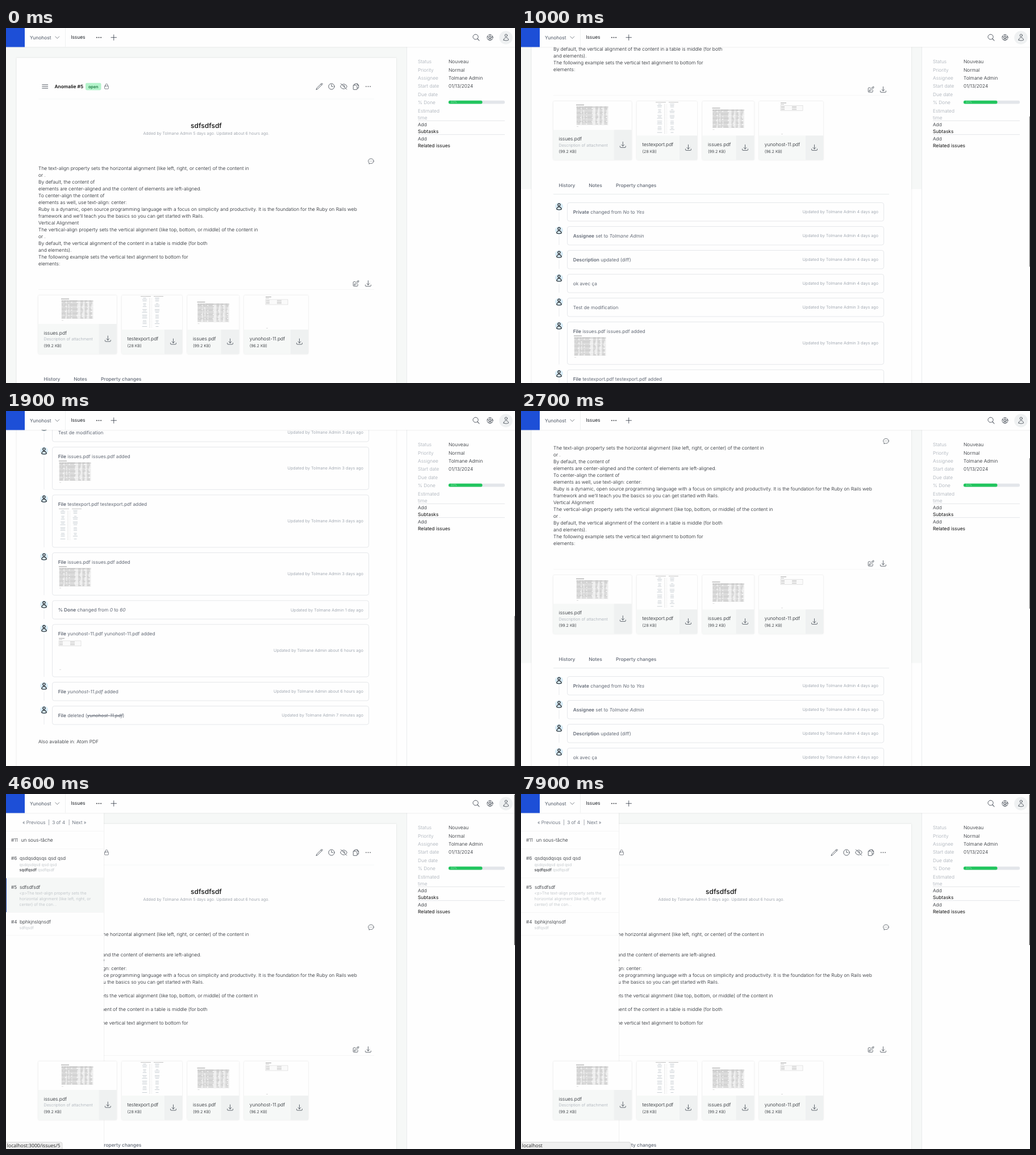
Write an HTML page that moves like this. It is 896 px wide and 625 px high and loops after 8 s.

```html
<!DOCTYPE html>
<html lang="en">
<head>
<meta charset="utf-8">
<title>Issue tracker</title>
<style>
  html, body { margin: 0; width: 100%; height: 100%; overflow: hidden; background: #fefefe; }
  svg { display: block; width: 896px; height: 625px; }
  text { font-family: Inter, sans-serif; font-weight: 300; text-rendering: geometricPrecision; white-space: pre; }
  .icon { fill: none; stroke: #2b333e; stroke-width: 1.3; stroke-linecap: round; stroke-linejoin: round; }
  .raised { filter: drop-shadow(0 .6px 1px #0002); }
</style>
</head>
<body>
<svg id="stage" viewBox="0 0 896 625"></svg>
<script>
const INK = '#1b1f25', GRAY = '#636a76', PALE = '#a3aab3', RULE = '#f3f4f4';
const USER = 'Tolmane Admin';

// ---------- drawing helpers ----------
const text = (x, y, str, { size = 8.4, fill = INK, weight = 300, anchor = 'start' } = {}) =>
  `<text x="${x}" y="${y + size * .35}" font-size="${size}" fill="${fill}" style="font-weight:${weight}" text-anchor="${anchor}">${str}</text>`;
const small = (x, y, str, options) => text(x, y, str, { size: 7.2, fill: PALE, ...options });
const rect = (x, y, w, h, fill, more = '') =>
  `<rect x="${x}" y="${y}" width="${w}" height="${h}" fill="${fill}" ${more}/>`;
const circle = (x, y, r, fill, more = '') => `<circle cx="${x}" cy="${y}" r="${r}" fill="${fill}" ${more}/>`;
const rule = (x, y, w, color = RULE) => rect(x, y, w, .8, color);
const bold = s => `<tspan style="font-weight:600">${s}</tspan>`;
const italic = s => `<tspan font-style="italic">${s}</tspan>`;
const repeat = (n, draw) => Array.from({ length: n }, (_, i) => draw(i)).join('');
const noise = n => { const v = Math.sin(n * 127.1 + 3) * 43758.5453; return v - Math.floor(v); };

const ICONS = {
  bars: 'M3.75 6.75h16.5M3.75 12h16.5M3.75 17.25h16.5',
  chevron: 'M19.5 8.25l-7.5 7.5-7.5-7.5',
  plus: 'M12 4v16M4 12h16',
  search: 'M21 21l-5.2-5.2A7.5 7.5 0 105.2 5.2a7.5 7.5 0 0010.6 10.6z',
  wheel: 'M21 12a9 9 0 11-18 0 9 9 0 0118 0zM15.5 12a3.5 3.5 0 11-7 0 3.5 3.5 0 017 0zM12 3v5.5M12 15.5V21M3.5 9.5l5.2 1.3M20.5 9.5l-5.2 1.3M6.5 19l3-4.4M17.5 19l-3-4.4',
  user: 'M15.75 6a3.75 3.75 0 11-7.5 0 3.75 3.75 0 017.5 0zM4.5 20.1a7.5 7.5 0 0115 0A18 18 0 0112 21.75a18 18 0 01-7.5-1.65z',
  lock: 'M16.5 10.5V6.75a4.5 4.5 0 10-9 0v3.75M6 10.5h12a1.5 1.5 0 011.5 1.5v8a1.7 1.7 0 01-1.5 1.7H6A1.7 1.7 0 014.5 20v-8A1.5 1.5 0 016 10.5z',
  pencil: 'M16.86 4.49l1.69-1.69a1.875 1.875 0 112.65 2.65L6.83 19.82 2.25 21.75l1.94-4.58zM16.86 4.49l2.64 2.64',
  clock: 'M12 6v6h4.5M21 12a9 9 0 11-18 0 9 9 0 0118 0z',
  hidden: 'M4 8.2A10.5 10.5 0 001.9 12a10.5 10.5 0 0013 7.1M6.2 6.2a10.5 10.5 0 0115.9 5.8 10.5 10.5 0 01-4.3 5.8M3 3l18 18M14.1 14.1a3 3 0 10-4.2-4.2',
  copy: 'M8 7.5V4.5A1.2 1.2 0 019.2 3.3H16l4.2 4.2V16a1.2 1.2 0 01-1.2 1.2h-3.2M15.8 3.5V8h4.4M4.9 7.5h6l4.9 5v7.8a1.2 1.2 0 01-1.2 1.2H4.9a1.2 1.2 0 01-1.2-1.2V8.7a1.2 1.2 0 011.2-1.2z',
  chat: 'M8 12h.1M12 12h.1M16 12h.1M21 12c0 4.5-4 8-9 8a10 10 0 01-2.5-.3A6 6 0 015 21a4.5 4.5 0 00.8-3.2A7.8 7.8 0 013 12c0-4.5 4-8 9-8s9 3.5 9 8z',
  edit: 'M16.86 4.49l1.69-1.69a1.875 1.875 0 112.65 2.65L10.6 16.1 6 18l1.9-4.6zM16.86 4.49l2.64 2.64M18 14v4.75A2.25 2.25 0 0115.75 21H5.25A2.25 2.25 0 013 18.75V8.25A2.25 2.25 0 015.25 6H10',
  download: 'M3 16.5v2.25A2.25 2.25 0 005.25 21h13.5A2.25 2.25 0 0021 18.75V16.5M16.5 12L12 16.5 7.5 12M12 16.5V3'
};
const icon = (name, x, y, scale = .57, more = '') =>
  `<path class="icon" d="${ICONS[name]}" transform="translate(${x} ${y}) scale(${scale}) translate(-12 -12)" ${more}/>`;
const dots = (x, y, r = .9) => repeat(3, i => circle(x + (i - 1) * 3.6, y, r, INK));

// ---------- document previews ----------
const previews = {
  table: (x, y) => rect(x, y, 14, 1, '#999') + rect(x + .5, y + 3, 56, 32, '#f7f7f7') +
    rect(x + .5, y + 3, 56, 2.2, '#d8d8d8') +
    repeat(14, r => rect(x + .5, y + 5.2 + r * 2.3, 56, .4, '#c8c8c8') +
      [1, 5, 10, 15, 20, 34, 42, 50].map((c, i) =>
        rect(x + c, y + 3.7 + r * 2.3, (i === 4 ? 7 : 2) + noise(r * 9 + i) * 3, .8, '#b2b2b2')).join('')) +
    repeat(5, c => rect(x + [4.5, 14.5, 19.5, 41, 49][c], y + 3, .4, 32, '#ccc')) +
    rect(x + 1, y + 38, 3, .7, '#ccc'),
  columns: (x, y) => rect(x, y, 18, .7, '#aaa') + rect(x + 23, y, 17, .7, '#aaa') +
    repeat(21, r => [7, 29].map((c, i) => {
      const w = 4 + noise(r * 3 + i) * 5;
      return r % 4 === 3 ? '' : rect(x + c - w / 2, y + 3 + r * 2.5, w, .9, '#c3cad0');
    }).join('') + rect(x + 15.5, y + 4 + r * 2.5, 1, 1.2, '#ccc') + rect(x + 19, y + 4 + r * 2.5, .6, 1.2, '#d8d8d8')),
  form: (x, y) => rect(x, y, 10, .9, '#999') + rect(x, y + 2.5, 6, .7, '#bbb') +
    rect(x, y + 5, 39, 9, '#fafafa', 'stroke="#ccc" stroke-width=".5"') +
    repeat(3, r => rect(x + 1, y + 6.5 + r * 2.5, 6, .7, '#aaa') + rect(x + 20, y + 6.5 + r * 2.5, 8, .7, '#aaa')) +
    rect(x + 1, y + 55, 3, .7, '#ccc')
};

// ---------- page ----------
const DESCRIPTION = [
  'The text-align property sets the horizontal alignment (like left, right, or center) of the content in',
  'or .', 'By default, the content of',
  'elements are center-aligned and the content of elements are left-aligned.',
  'To center-align the content of', 'elements as well, use text-align: center:',
  'Ruby is a dynamic, open source programming language with a focus on simplicity and productivity. It is the foundation for the Ruby on Rails web',
  'framework and we’ll teach you the basics so you can get started with Rails.',
  'Vertical Alignment',
  'The vertical-align property sets the vertical alignment (like top, bottom, or middle) of the content in',
  'or .', 'By default, the vertical alignment of the content in a table is middle (for both',
  'and elements).', 'The following example sets the vertical text alignment to bottom for', 'elements:'
];
// The pasted paragraph about Rails is set slightly smaller than the rest.
const proseSize = line => line.includes('Rails') ? 8.4 : 8.47;

const added = file => `${bold('File')} ${file} ${file} added`;
const JOURNAL = [
  [`${bold('Private')} changed from ${italic('No')} to ${italic('Yes')}`, '4 days'],
  [`${bold('Assignee')} set to ${italic(USER)}`, '4 days'],
  [`${bold('Description')} updated (diff)`, '4 days'],
  ['ok avec ça', '4 days'],
  ['Test de modification', '3 days'],
  [added('issues.pdf'), '3 days', 'table'],
  [added('testexport.pdf'), '3 days', 'columns'],
  [added('issues.pdf'), '3 days', 'table'],
  [`${bold('% Done')} changed from ${italic('0')} to ${italic('60')}`, '1 day'],
  [added('yunohost-11.pdf'), 'about 6 hours', 'form'],
  [`${bold('File')} ${italic('yunohost-11.pdf')} added`, 'about 6 hours'],
  [`${bold('File')} deleted (<tspan font-style="italic" text-decoration="line-through">yunohost-11.pdf</tspan>)`, '7 minutes']
];

function journal() {
  let y = 649;
  return JOURNAL.map(([entry, age, preview]) => {
    const h = !preview ? 32.5 : preview === 'table' ? 74.8 : 92.2;
    const top = y;
    y += h + 9.5;
    return rect(66.6, top + 17, .8, h - 17, '#e3e6e8') +
      circle(67, top + 7, 7, '#d8ecf8') +
      icon('user', 67, top + 7, .56, 'style="stroke:#111;stroke-width:2"') +
      rect(81.6, top, 557, h, '#fefefe', 'rx="3.5" stroke="#e2e5e8" stroke-width=".9"') +
      text(91.7, top + 16.5, entry, { fill: GRAY, weight: 400, size: 8.3 }) +
      (preview ? previews[preview](93, top + 24) : '') +
      small(629, top + h / 2, `Updated by ${USER} ${age} ago`, { anchor: 'end', weight: 400 });
  }).join('');
}

const page = () =>
  rect(0, 0, 896, 625, '#f6f8f7') +
  rect(18.5, 52.5, 668.5, 1500, '#fefefe', 'class="raised"') +
  circle(69, 103, 12, '#eff1f2', 'id="menuHover"') +
  icon('bars', 68.7, 103, .6, 'id="menuIcon"') +
  text(85.5, 103.4, 'Anomalie #5', { weight: 600, fill: '#111' }) +
  rect(140, 96.8, 27.5, 12.6, '#b4f3cb', 'rx="2.4"') +
  text(153.7, 103.2, 'open', { size: 7.2, weight: 600, fill: '#1d7a42', anchor: 'middle' }) +
  icon('lock', 177, 102.8, .45) +
  ['pencil', 'clock', 'hidden', 'copy'].map((name, i) => icon(name, 551.5 + i * 21.5, 103)).join('') +
  dots(637.5, 103, .8) + rule(57, 124.6, 591) +
  text(352.5, 171.8, 'sdfsdfsdf', { size: 12, weight: 500, fill: '#111', anchor: 'middle' }) +
  small(352.5, 185.2, `Added by ${USER} 5 days ago. Updated about 6 hours ago.`, { anchor: 'middle', fill: '#8b929c' }) +
  icon('chat', 642.5, 234.3, .53) +
  DESCRIPTION.map((line, i) => text(57, 246.7 + i * 12, line, { size: proseSize(line) })).join('') +
  icon('edit', 616, 449.8, .53) + icon('download', 637.5, 449.8, .55) + rule(57, 460, 591) +
  [[66.5, 'History'], [119.2, 'Notes'], [167, 'Property changes']]
    .map(([x, label]) => text(x, 618.5, label, { weight: 500, fill: GRAY })).join('') +
  rule(57, 633.8, 591, '#e2e5e7') + journal() +
  text(57, 1377.5, 'Also available in: Atom PDF');

const attachment = (x, right, split, buttonX, name, kb, preview, px, py, note) => {
  const nameY = note ? 537 : 546.7;
  return `<g class="raised">${rect(x, 470.5, right - x, 103.3, '#fefefe', 'rx="2"')}</g>` +
    rect(x, split, right - x, 573.8 - split, '#f6f8f7') +
    rect(buttonX, split, right - buttonX, 573.8 - split, '#eff1f1') +
    previews[preview](px, py) +
    text(x + 9.7, nameY, name, { size: 8.47 }) + (note ? small(x + 9.7, 547.7, note) : '') +
    small(x + 9.7, 559, `(${kb} KB)`, { fill: INK }) +
    icon('download', (buttonX + right) / 2, note ? 547 : 552, .55);
};
const attachments = () =>
  attachment(56.8, 194.8, 521, 163.8, 'issues.pdf', '99.2', 'table', 97, 476.5, 'Description of attachment') +
  attachment(203.8, 310, 531, 279, 'testexport.pdf', '28', 'columns', 237, 472) +
  attachment(319.2, 410.3, 531, 378.8, 'issues.pdf', '99.2', 'table', 336.5, 482) +
  attachment(419, 532, 531, 501, 'yunohost-11.pdf', '96.2', 'form', 457, 473);

// ---------- fixed parts ----------
const drawer = () =>
  rect(0, 33, 172, 592, '#fefefe', 'class="raised"') +
  '<g id="rowHover">' + rect(0, 0, 172, 1, '#f5f7f6') + rect(0, 0, 1, 1, '#3156b8') + '</g>' +
  [[29, '« Previous'], [74.3, '|'], [81.2, '3 of 4'], [109.8, '|'], [116.3, 'Next »']]
    .map(([x, s]) => text(x, 50, s, { fill: '#4b5563' })).join('') +
  [65, 96.5, 147.5, 208, 248.5].map(y => rule(0, y, 172)).join('') +
  [[81.5, '#11', 26.5, 'un sous-tâche'], [113.3, '#6', 24, 'qsdqsdqsqs qsd qsd'],
   [164, '#5', 24, 'sdfsdfsdf'], [224.7, '#4', 24, 'bphkjnslqnsdf']]
    .map(([y, id, x, title]) => text(9, y, id) + text(x, y, title)).join('') +
  [[124, 'qsdqsdqsd qsd qsd'], [133.6, `<tspan fill="${INK}" style="font-weight:400">sqdfqsdf</tspan> qsdfqsdf`],
   [174.5, '&lt;p&gt;The text-align property sets the'], [184.5, 'horizontal alignment (like left, right, or'],
   [194.4, 'center) of the con...'], [235.3, 'sdfqsdf']]
    .map(([y, s]) => small(23.5, y, s, { fill: '#b4babf' })).join('');

const panel = () =>
  rect(705.5, 33, 191, 592, '#fefefe') + rect(705, 33, .9, 592, '#e8eaeb') +
  [['Status', 'Nouveau'], ['Priority', 'Normal'], ['Assignee', USER], ['Start date', '01/13/2024'],
   ['Due date', ''], ['% Done', ''], ['Estimated', '']]
    .map(([label, value], i) => text(725, 59.5 + i * 14.35, label, { fill: PALE }) + text(779, 59.5 + i * 14.35, value)).join('') +
  text(725, 157.6, 'time', { fill: PALE }) +
  rect(779, 127.7, 99, 5.8, '#e3e6ea', 'rx="2.5"') + rect(779, 127.7, 59.5, 5.8, '#22c55e', 'rx="2.5"') +
  text(783.5, 130.6, '60%', { size: 4.8, fill: '#a5ebbf' }) +
  rule(725, 162.8, 153, '#dfe2e5') + text(725, 170.2, 'Add') + text(725, 182.3, 'Subtasks', { weight: 400, fill: '#111' }) +
  rule(725, 187.3, 153, '#dfe2e5') + text(725, 194.7, 'Add') + text(725, 206.7, 'Related issues', { weight: 400, fill: '#111' });

const header = () =>
  rect(0, 0, 896, 33.5, '#fefefe', 'class="raised"') + rect(0, 0, 33, 33.5, '#1d4fd7') +
  text(42, 17, 'Yunohost', { weight: 400, fill: '#4b5563' }) + icon('chevron', 90.3, 16.7, .46) +
  rect(104, 0, .9, 33, '#eef0f0') +
  text(114.2, 16.5, 'Issues', { weight: 400 }) + dots(163.5, 16.7) + icon('plus', 189.7, 16.7, .6) +
  icon('search', 827.5, 16.7, .6) + icon('wheel', 852, 16.7, .56) +
  circle(880, 17, 11.8, '#eff1f2') + icon('user', 880.3, 16.5);

const $ = id => document.getElementById(id);
$('stage').innerHTML =
  `<g id="page">${page()}</g><g id="drawer">${drawer()}</g><g id="files">${attachments()}</g>` +
  panel() + header() + rect(894.8, 1, 1.2, 265, '#777', 'id="thumb" rx=".6"') +
  '<g id="status"><path id="statusBox" fill="#f0f0f0" stroke="#c9c9c9" stroke-width=".7"/>' +
  '<text id="statusText" x="1.8" y="622.4" font-size="8.6" fill="#222" style="font-family:\'Open Sans\',sans-serif;font-weight:400"></text></g>';

// ---------- motion ----------
const LOOP = 8000, STEP = 100;
const GLIDES = [[700, 1000, 341.5], [1200, 1400, 568], [1700, 1900, 795.5], [2500, 2700, 181.5], [2800, 2900, 0]];
const ROWS = { 6: [97, 50.5], 5: [148, 60] };
const HOVERS = [[0, 0], [4500, 6], [4600, 5], [5300, 0], [7300, 6], [7700, 0]];
const LINKS = [[0, ''], [4500, 'localhost:3000/issues/6'], [4600, 'localhost:3000/issues/5'], [5500, ''],
  [7300, 'localhost:3000/issues/6'], [7700, 'localhost']];

const within = (t, a, b) => t >= a && t < b;
const progress = (t, a, b) => Math.min(1, Math.max(0, (t - a) / (b - a)));
const ease = p => p * p * (3 - 2 * p);
const latest = (list, t) => list.filter(([at]) => at <= t).pop()[1];
const show = (id, on) => $(id).setAttribute('visibility', on ? 'visible' : 'hidden');

function render(t) {
  const scroll = GLIDES.reduce((pos, [a, b, to]) => pos + (to - pos) * ease(progress(t, a, b)), 0);
  for (const id of ['page', 'files']) $(id).setAttribute('transform', `translate(0 ${-scroll})`);

  show('thumb', t >= 400);
  $('thumb').setAttribute('y', 1 + scroll * .4523);
  $('thumb').setAttribute('fill', t < 3800 ? '#8a8a8a' : '#4a4a4a');

  show('menuHover', within(t, 2900, 4200) || t >= 5800);
  $('menuIcon').setAttribute('opacity', within(t, 2900, 3500) || within(t, 5800, 6400) ? .8 : 1);

  const open = t < 5500 ? ease(progress(t, 3900, 4200)) : ease(progress(t, 6700, 7100));
  show('drawer', open > 0);
  $('drawer').setAttribute('transform', `translate(${(open - 1) * 172} 0)`);

  const row = ROWS[latest(HOVERS, t)];
  $('rowHover').setAttribute('transform', row ? `translate(0 ${row[0]}) scale(1 ${row[1]})` : 'scale(0)');

  const link = latest(LINKS, t);
  show('status', link);
  $('statusText').textContent = link;
  $('statusBox').setAttribute('d', `M-1 613h${link === 'localhost' ? 191 : 97}q3 0 3 3v10H-1z`);
}

function tick() {
  render(Math.floor(performance.now() % LOOP / STEP) * STEP);
  requestAnimationFrame(tick);
}
tick();
</script>
</body>
</html>
```
